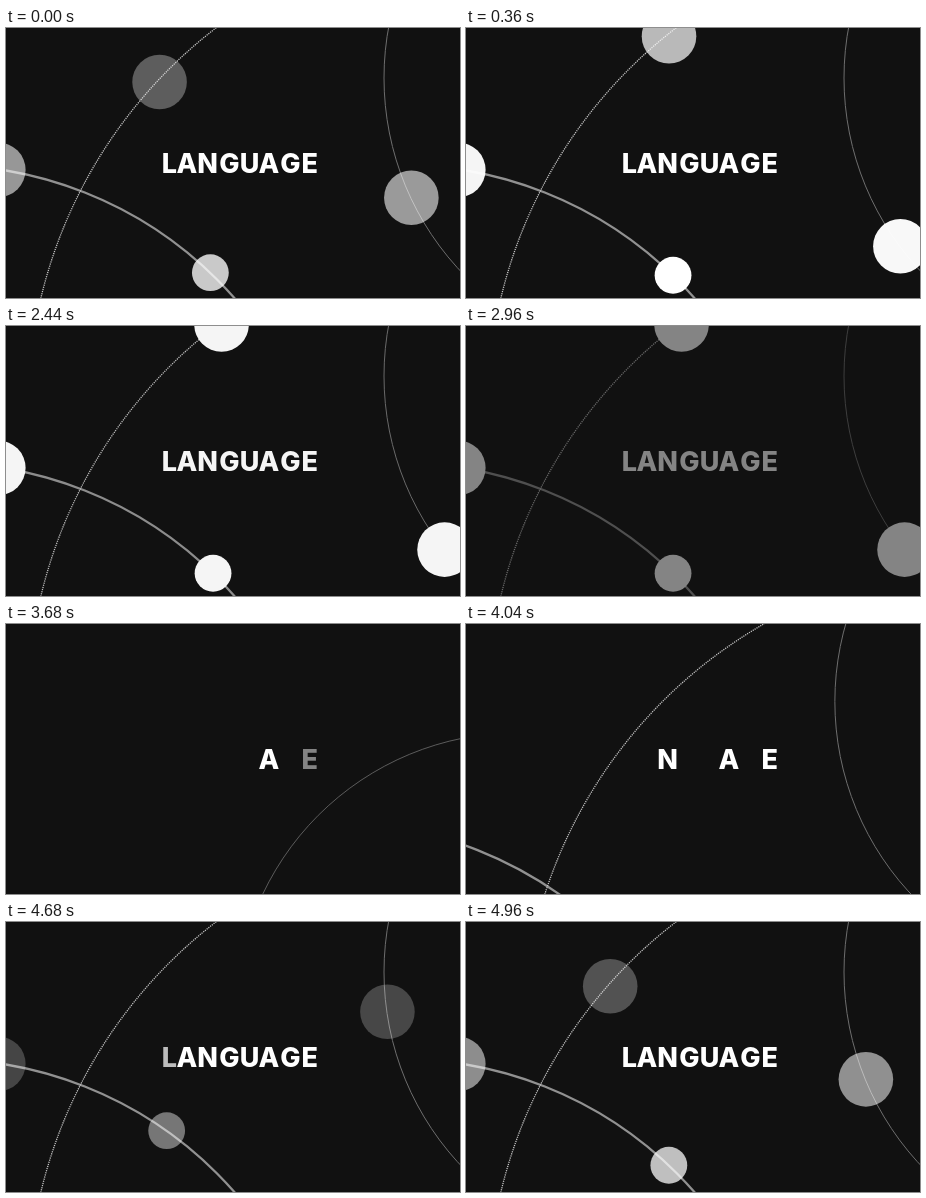
These frames come from a looping animation (454 px wide and 270 px high, 5000 ms). An HTML page:

```html
<!DOCTYPE html>
<html lang="en">
<head>
<meta charset="utf-8">
<title>Language</title>
<style>
  html, body { margin: 0; width: 100%; height: 100%; overflow: hidden; background: #111; }
  svg { display: block; width: 454px; height: 270px; }
  text {
    font: 800 27px Inter, "Liberation Sans", sans-serif;
    font-optical-sizing: none;
    fill: #fff;
    text-anchor: middle;
  }
</style>
</head>
<body>
<svg viewBox="0 0 454 270">
  <rect width="454" height="270" fill="#111"/>
  <g id="scene"></g>
</svg>
<script>
const LOOP = 5000, INTRO = 3500;
const scene = document.getElementById('scene');

const clamp = v => Math.min(1, Math.max(0, v));
const span = (t, start, length) => clamp((t - start) / length);
const mix = (a, b, p) => a + (b - a) * p;
const easeOut = (p, power) => 1 - (1 - p) ** power;

// Quadratic start for `a` ms, then a long quintic stop for `b` ms, with matching speed.
function glide(t, a, b) {
  const share = 5 * a / (5 * a + 2 * b);
  if (t <= 0) return 0;
  return t < a ? share * (t / a) ** 2 : share + (1 - share) * easeOut(clamp((t - a) / b), 5);
}

function add(name, attrs) {
  const el = document.createElementNS('http://www.w3.org/2000/svg', name);
  for (const key in attrs) el.setAttribute(key, attrs[key]);
  return scene.appendChild(el);
}

// Rings: steps are [time, centre x, centre y, easing power towards this step].
const rings = [
  { r: 389.3, stroke: '#919191', width: 2.3, dash: 'none',
    steps: [[3720, -407, 840], [4680, -64.5, 526.5, 4]] },
  { r: 481.8, stroke: '#c4c4c4', width: 1.3, dash: '1.2 1',
    steps: [[3690, 833.5, 732], [4650, 503.5, 382, 5]] },
  { r: 282, stroke: '#6e6e6e', width: 1, dash: 'none',
    steps: [[3560, 408, 624], [4320, 663.5, 49, 3], [4600, 660, 50, 2]] }
];
for (const ring of rings) {
  ring.el = add('circle', { r: ring.r, fill: 'none', stroke: ring.stroke,
    'stroke-width': ring.width, 'stroke-dasharray': ring.dash });
}

// Balls orbit the settled ring centres; angles in degrees.
const balls = [
  { ring: 0, orbit: 388.8, r: 27.3, start: 4480, from: -81.6, to: -81.6, a: 300, b: 800 },
  { ring: 0, orbit: 389.5, r: 18.4, start: 4290, from: -73.4, to: -45.8, a: 320, b: 820 },
  { ring: 1, orbit: 479.6, r: 27.3, start: 4710, from: 215.9, to: 233.1, a: 250, b: 1316 },
  { ring: 2, orbit: 281.4, r: 27.3, start: 4470, from: 175.1, to: 141.9, a: 500, b: 1034 }
];
for (const ball of balls) ball.el = add('circle', { r: ball.r, fill: '#fff' });

// Letters: [glyph, centre x, time it fades in]
const letters = [
  ['L', 163.3, 4620], ['A', 181, 4255], ['N', 201.5, 3860], ['G', 223.3, 4080],
  ['U', 243.5, 4440], ['A', 263, 3540], ['G', 284.3, 4530], ['E', 303.7, 3640]
].map(([glyph, x, start]) => {
  const el = add('text', { x, y: 144.8 });
  el.textContent = glyph;
  return { el, start };
});

function drawRing({ el, steps }, t) {
  let [, x, y] = steps[0];
  for (let i = 1; i < steps.length; i++) {
    const [t0] = steps[i - 1], [t1, x1, y1, power] = steps[i];
    const p = easeOut(span(t, t0, t1 - t0), power);
    x = mix(x, x1, p);
    y = mix(y, y1, p);
  }
  el.setAttribute('cx', x);
  el.setAttribute('cy', y);
  el.setAttribute('opacity', span(t, steps[0][0], 150));
}

function drawBall(ball, t) {
  const { steps } = rings[ball.ring];
  const [, cx, cy] = steps[steps.length - 1];
  const angle = mix(ball.from, ball.to, glide(t - ball.start, ball.a, ball.b)) * Math.PI / 180;
  ball.el.setAttribute('cx', cx + ball.orbit * Math.cos(angle));
  ball.el.setAttribute('cy', cy + ball.orbit * Math.sin(angle));
  ball.el.setAttribute('opacity', span(t, ball.start, 920));
}

function draw(now) {
  const time = now % LOOP;
  const t = time < INTRO ? time + LOOP : time;
  for (const ring of rings) drawRing(ring, t);
  for (const ball of balls) drawBall(ball, t);
  for (const { el, start } of letters) el.setAttribute('opacity', span(t, start, 85));
  scene.setAttribute('opacity', time < INTRO ? 1 - span(time, 2400, 1080) : 1);
}

function tick() {
  draw(performance.now());
  requestAnimationFrame(tick);
}
tick();
</script>
</body>
</html>
```
